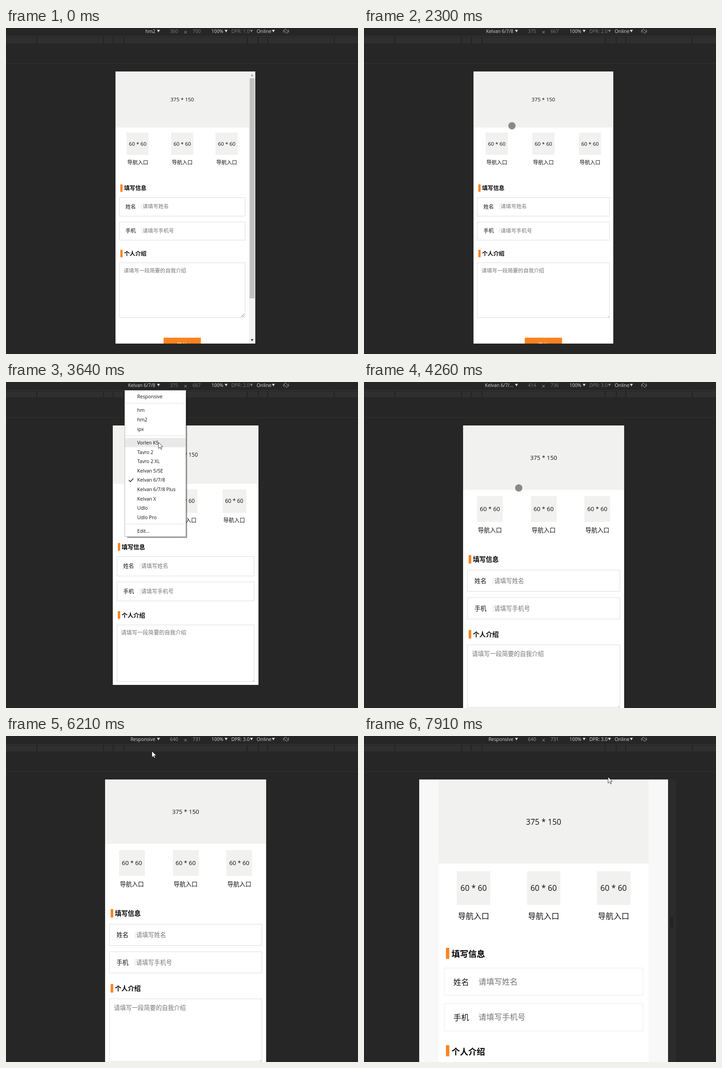
An HTML page that plays this animation: 778 by 720 pixels, repeating every 7990 ms.

```html
<!DOCTYPE html>
<html lang="zh-CN">
<head>
<meta charset="utf-8">
<title>Responsive page preview</title>
<style>
  html, body { margin: 0; width: 100%; height: 100%; overflow: hidden; background: #262626; }
  svg { display: block; width: 778px; height: 720px; }
  text { font-family: "Open Sans", "Noto Sans CJK SC", "Noto Sans CJK", sans-serif; white-space: pre; }
</style>
</head>
<body>
<svg viewBox="0 0 778 720">
  <g id="frame"></g>
  <g id="bar"></g>
  <g id="page"></g>
  <g id="menu"></g>
  <g id="pointer"></g>
</svg>
<script>
const LOOP = 7990;
const ZOOM = 0.859;
const TOP = 96;
const CENTER = 396.7;

// Toolbar: start, label, width, height, pixel ratio
const DEVICES = [
  [0, 'hm2', 360, 700, '1.0'],
  [2300, 'Kelvan 6/7/8', 375, 667, '2.0'],
  [4180, 'Kelvan 6/7/...', 414, 736, '3.0'],
  [6210, 'Responsive', 640, 731, '3.0'],
];
// Viewport: start, width, height, options
const VIEWS = [
  [0, 360, 700, { scrollbar: true }],
  [2300, 360, 700, {}],
  [2390, 375, 667, {}],
  [4260, 414, 736, {}],
  [6290, 640, 731, { handle: true }],
  [6990, 640, 731, { handle: true, capped: true }],
];
// Open, close, checked item
const MENUS = [
  [1380, 2300, 'hm2'],
  [3410, 4180, 'Kelvan 6/7/8'],
  [5670, 6210, 'Kelvan 6/7/8 Plus'],
];
// Pointer moves: start, end, steps, then a quadratic curve
const MOVES = [
  [370, 1150, 11, 770, 455, 470, 160, 327, 8],
  [1380, 2070, 10, 327, 8, 345, 130, 327, 216],
  [2700, 3180, 7, 327, 216, 320, 90, 303, 8],
  [3410, 3950, 8, 303, 8, 357, 178, 342, 234],
  [4640, 5430, 11, 342, 234, 525, 160, 302, 6],
  [5520, 5520, 1, 302, 6, 302, 4, 303, 2],
  [5670, 5980, 5, 303, 2, 318, 18, 322, 33],
  [6210, 6820, 9, 322, 33, 360, 54, 402, 59],
  [7530, 7910, 6, 402, 59, 470, 66, 539, 90],
];
const ROWS = [
  ['Responsive', 32.5], ['hm', 62.5], ['hm2', 83.2], ['ipx', 104],
  ...['Vorlen K5', 'Tavro 2', 'Tavro 2 XL', 'Kelvan 5/SE', 'Kelvan 6/7/8',
    'Kelvan 6/7/8 Plus', 'Kelvan X', 'Udlo', 'Udlo Pro'].map((name, i) => [name, 134 + i * 20.6]),
  ['Edit...', 329],
];

const latest = (list, t) => list.filter(item => item[0] <= t).pop();
const rect = (x, y, w, h, fill, extra = '') =>
  `<rect x="${x}" y="${y}" width="${w}" height="${h}" fill="${fill}" ${extra}/>`;
const path = (d, stroke, width = 1) =>
  `<path d="${d}" fill="none" stroke="${stroke}" stroke-width="${width}"/>`;
const text = (str, x, cy, size, fill, anchor = 'start', extra = '') =>
  `<text x="${x}" y="${cy + size * 0.37}" font-size="${size}" fill="${fill}" text-anchor="${anchor}" ${extra}>${str}</text>`;
const triangle = (x, y, fill, r = 3.3, dir = 1) =>
  `<path d="M${x - r} ${y - r * 0.8 * dir}h${2 * r}l${-r} ${r * 1.7 * dir}z" fill="${fill}"/>`;

function drawFrame() {
  const ticks = [68, 215.5, 237, 260.5, 533, 557.5, 578.5, 725.5];
  return rect(0, 0, 778, 720, '#262626') + rect(0, 18, 778, 1, '#3b3b3b') +
    rect(0, 21, 778, 13, '#2f2f2f') + rect(0, 78, 778, 1, '#333') +
    ticks.map(x => rect(x - 1, 20, 2, 15, '#222')).join('');
}

function drawBar([, label, w, h, ratio]) {
  const free = label === 'Responsive';
  const light = '#d6d6d6', dim = '#7c7c7c';
  const size = 10.4, y = 7.3;
  return text(label, 330, y, size, light, 'end') + triangle(337, 6.7, light) +
    text(w, 371.5, y, size, free ? '#9c9caa' : dim, 'middle') +
    path('M394 6.5l5.5 5.5m0-5.5l-5.5 5.5', '#aaa') +
    text(h, 421.5, y, size, free ? '#9c9caa' : dim, 'middle') +
    text('100%', 454, y, size, light) + triangle(486.5, 6.7, light) +
    text('DPR: ' + ratio, 498, y, size, free ? light : dim) + triangle(542.5, 6.7, free ? light : dim) +
    text('Online', 554, y, size + 0.3, light) + triangle(591, 6.7, light) +
    '<g transform="translate(619 7) rotate(-45)" fill="none" stroke="#999">' +
    '<rect x="-2.4" y="-4.6" width="4.8" height="9.2" rx="1"/>' +
    '<path d="M-5.6 -.5A5.6 5.6 0 0 1 -2 -5.4M5.6 .5A5.6 5.6 0 0 1 2 5.4"/></g>';
}

function drawPage([, cssW, cssH, opt]) {
  const left = Math.round(CENTER - cssW * ZOOM / 2);
  const right = Math.round(CENTER + cssW * ZOOM / 2);
  const height = Math.round(cssH * ZOOM);
  const u = Math.min(cssW, 540) * ZOOM / 375;
  const x0 = opt.capped ? 165 : left;
  const x1 = opt.capped ? 629 : opt.scrollbar ? right - 14 : right;
  const w = x1 - x0, mid = x0 + w / 2, font = 14 * u;
  const at = (scale, offset = 0) => TOP + scale * u + offset;
  const ink = '#111', hint = '#757575', line = opt.capped ? '#ebebeb' : '#dcdcdc';
  const orange = '#fb831f', grey = '#f1f1f0';

  const box = (y, bottom) => {
    const x = Math.round(x0 + 10 * u) + 0.5, top = Math.round(y) + 0.5;
    return rect(x, top, Math.round(x1 - 10 * u) - x - 0.5, Math.round(bottom) - top - 0.5, '#fff', `stroke="${line}"`);
  };
  const title = (str, barY, cy) => rect(x0 + 13 * u, barY, 6 * u, 19.8 * u, orange) +
    text(str, x0 + 23 * u, cy, 15 * u, '#000', 'start', 'font-weight="700"');
  const field = (label, prompt, y, bottom, cy) => box(y, bottom) +
    text(label, x0 + 25.5 * u + 1, cy, font, ink) +
    (opt.capped ? '' : rect(Math.round(x0 + 68 * u + 2), cy - 8.5 * u, 1, 17 * u, '#dcdcdc')) +
    text(prompt, x0 + 68 * u + 4, cy - 0.4, font, hint);

  let out = `<clipPath id="view"><rect x="${left}" y="${TOP}" width="${right - left}" height="${height}"/></clipPath>`;
  if (opt.handle) {
    out += rect(right, TOP, 17, 624, '#2b2b2b') + rect(678, 400, 1.3, 22, '#171720') + rect(681, 400, 1.3, 22, '#171720');
  }
  out += '<g clip-path="url(#view)">' + rect(left, TOP, right - left, height, opt.capped ? '#f8f8f8' : '#fff') +
    rect(x0, TOP, w, height, '#fff') + rect(x0, TOP, w, 150 * u, grey) +
    text('375 * 150', mid, at(75.3), font, ink, 'middle');
  for (const k of [1, 3, 5]) {
    const cx = x0 + w * k / 6;
    out += rect(Math.round(cx - 30 * u), Math.round(at(164)), Math.round(60 * u), Math.round(60 * u), grey) +
      text('60 * 60', cx, at(194), font, ink, 'middle') +
      text('导航入口', cx, at(244), font, ink, 'middle');
  }
  out += title('填写信息', at(297, 4.5), at(309, 3)) +
    field('姓名', '请填写姓名', at(334.6, 2), at(380.7, 6), at(361, 0.8)) +
    field('手机', '请填写手机号', at(394, 6.6), at(445, 5.6), at(420.6, 5.2)) +
    title('个人介绍', at(468, 8), at(480, 7)) +
    box(at(500, 10), at(637, 19)) +
    text('请填写一段简要的自我介绍', x0 + 12 * u + 8, at(517, 13.3), font, hint) +
    rect(mid - 50 * u, at(713), 100 * u, 44 * u, orange) +
    text('确认', mid, at(732), font, '#fff', 'middle');
  const gx = x1 - 10 * u - 1.5, gy = at(637, 17.5);
  out += opt.scrollbar
    ? path(`M${gx - 7.5} ${gy - 0.5}l7-7m-3 7l3-3`, '#666')
    : rect(gx - 1.5, gy - 1.5, 1.5, 1.5, '#888');
  if (opt.scrollbar) {
    out += rect(x1, TOP, 14, height, '#f1f1f1') + rect(x1 + 1.5, 111, 11, 486, '#c1c1c1') +
      triangle(x1 + 7, 104, '#a3a3a3', 3, -1) + triangle(x1 + 7, 689.5, '#454545', 3);
  }
  return out + '</g>';
}

function drawMenu(menu, t, y) {
  if (!menu) return '';
  const shadow = [0.28, 0.18, 0.08].map((a, i) =>
    path(`M268 ${342.5 + i}H${398.5 + i}V24`, `rgba(0,0,0,${a * 1.8})`)).join('');
  if (menu[0] === 5670 && t < 5750) return shadow;
  let out = shadow + rect(262.5, 18.5, 135, 323, '#fff', 'stroke="#b4b4b4"');
  for (const [name, cy] of ROWS) {
    if (Math.abs(y - cy) < 10.3) out += rect(263, cy - 10.5, 134, 20.5, '#e9e9e9');
    if (name === menu[2]) out += path(`M271.5 ${cy + 0.3}l3.3 3.4l6.8-7`, '#333', 1.7);
    out += text(name, 290, cy, 10.6, '#111');
  }
  return out + [46.5, 118, 313].map(cy => rect(264, cy, 132, 1, '#e0e0e0')).join('');
}

function pointerAt(t) {
  const move = latest(MOVES, t);
  if (!move) return null;
  const [start, end, steps, ax, ay, bx, by, cx, cy] = move;
  const last = steps - 1;
  const step = last ? Math.min(last, Math.floor((t - start) * last / (end - start) + 0.1)) : 0;
  const p = last ? step / last : 1, q = 1 - p;
  const curve = (a, b, c) => q * q * a + 2 * p * q * b + p * p * c;
  return [curve(ax, bx, cx), curve(ay, by, cy)];
}

function drawPointer(pos, view, menu) {
  if (!pos) return '';
  const [x, y] = pos;
  const inside = Math.abs(x - CENTER) < view[1] * ZOOM / 2 && y > TOP && y < TOP + view[2] * ZOOM;
  if (inside && !menu) return `<circle cx="${x}" cy="${y}" r="8" fill="rgba(100,100,100,.75)"/>`;
  return `<path transform="translate(${x} ${y}) scale(.86)" d="M.5 .5V16.5L4.2 13L6.8 18.6L9.2 17.5L6.7 12H11.8Z" fill="#fff" stroke="#222"/>`;
}

const shown = {};
function put(id, markup) {
  if (shown[id] === markup) return;
  shown[id] = markup;
  document.getElementById(id).innerHTML = markup;
}

function render(t) {
  const view = latest(VIEWS, t);
  const menu = MENUS.find(([open, close]) => t >= open && t < close);
  const pos = pointerAt(t);
  put('bar', drawBar(latest(DEVICES, t)));
  put('page', drawPage(view));
  put('menu', drawMenu(menu, t, pos ? pos[1] : 0));
  put('pointer', drawPointer(pos, view, menu));
}

put('frame', drawFrame());
const begin = performance.now();
function tick() {
  render((performance.now() - begin) % LOOP);
  requestAnimationFrame(tick);
}
tick();
</script>
</body>
</html>
```
